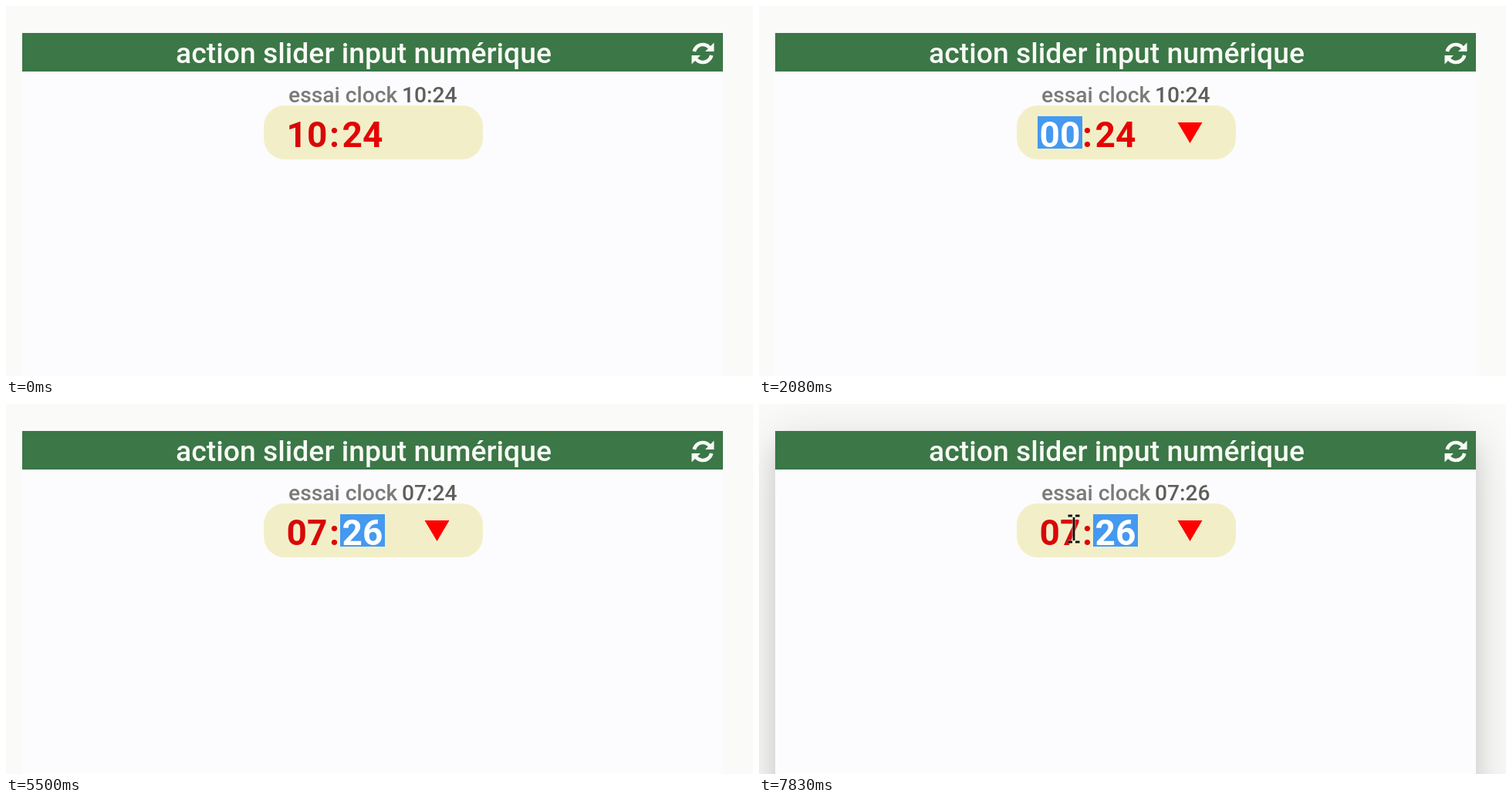
These frames come from a looping animation (968 by 480 pixels, 8000 ms). An HTML page with a canvas:

```html
<!DOCTYPE html>
<html lang="fr">
<head>
<meta charset="utf-8">
<title>Slider input</title>
<style>
html, body { margin: 0; width: 100%; height: 100%; overflow: hidden; background: #fafaf8; }
canvas { display: block; }
</style>
</head>
<body>
<canvas id="stage" width="968" height="480"></canvas>
<script>
const ctx = document.getElementById('stage').getContext('2d');
const LOOP = 8000, FPS = 12;
const CARD = { x: 21, y: 35, w: 908, h: 600 };
const FIELD = { x: 334, y: 129, w: 284, h: 70, r: 27 };
const LIGHT = '#f8faf4', BLUE = '#4499f0';

// Pointer visits: each point is [ms, x, y]
const visits = [
  { end: 1740, path: [[80, 640, 470], [420, 425, 215], [500, 405, 191], [580, 405, 191],
    [660, 368, 165], [750, 368, 165], [830, 381, 180], [1740, 386, 184]] },
  { end: LOOP, path: [[6750, 720, 470], [7330, 590, 255], [7580, 480, 95], [7830, 408, 162]] }
];

// Refresh icon spins: [start, end]
const spins = [[2840, 4075], [5670, 6905]];

const clamp = v => Math.max(0, Math.min(1, v));
function ramp(t, a, b) {
  const k = clamp((t - a) / (b - a));
  return k * k * (3 - 2 * k);
}

function text(str, x, y, size, weight, color, align = 'left') {
  ctx.font = `${weight} ${size}px Roboto, sans-serif`;
  ctx.fillStyle = color;
  ctx.textAlign = align;
  ctx.fillText(str, x, y);
}

function polygon(points, color) {
  ctx.beginPath();
  points.forEach(([x, y]) => ctx.lineTo(x, y));
  ctx.closePath();
  ctx.fillStyle = color;
  ctx.fill();
}

function cardShadow(alpha, blur, dy) {
  ctx.save();
  ctx.shadowColor = `rgba(0,0,0,${alpha})`;
  ctx.shadowBlur = blur;
  ctx.shadowOffsetY = dy;
  ctx.fillStyle = '#fcfcfe';
  ctx.fillRect(CARD.x, CARD.y, CARD.w, CARD.h);
  ctx.restore();
}

function drawCard(t) {
  ctx.fillStyle = '#fafaf8';
  ctx.fillRect(0, 0, 968, 480);
  const level = ramp(t, 0, 500) - ramp(t, 1000, 1420) + ramp(t, 6750, 7170);
  cardShadow(0.17 * level, 60, 16);
  cardShadow(0.08 * level, 24, 20);
  ctx.fillStyle = '#3b7747';
  ctx.fillRect(CARD.x, CARD.y, CARD.w, 50);
  text('action slider input numérique', 463.5, 74, 37.3, 500, LIGHT, 'center');
}

function drawRefresh(t) {
  const spin = spins.find(([a, b]) => t >= a && t < b);
  ctx.save();
  ctx.translate(903, 61.5);
  if (spin) ctx.rotate((t - spin[0]) / 1000 * 2 * Math.PI);
  for (let i = 0; i < 2; i++) {
    ctx.beginPath();
    ctx.arc(0, 0, 11.5, Math.PI * 1.07, Math.PI * 1.79);
    ctx.lineWidth = 4.6;
    ctx.strokeStyle = LIGHT;
    ctx.stroke();
    polygon([[14.5, -14], [14.5, -2.5], [3, -2.5]], LIGHT);
    ctx.rotate(Math.PI);
  }
  ctx.restore();
}

function drawPart(str, x, color, selected) {
  if (selected) {
    ctx.fillStyle = BLUE;
    ctx.fillRect(x, 143, 58, 42);
  }
  text(str, x + 29, 183, 46, 700, selected ? '#fff' : color, 'center');
}

function drawField(t) {
  const saved = t < spins[0][1] ? '10:24' : t < spins[1][1] ? '07:24' : '07:26';
  text('essai clock', 366, 124.5, 28.2, 500, '#7a7a78');
  text(saved, 584.5, 124.5, 28.2, 500, '#5e5e5a', 'right');

  ctx.beginPath();
  ctx.roundRect(FIELD.x, FIELD.y, FIELD.w, FIELD.h, FIELD.r);
  ctx.fillStyle = '#f2efc8';
  ctx.fill();

  const hours = t < 1995 ? '10' : t < 2415 ? '00' : '07';
  const minutes = t < 4910 ? '24' : t < 5495 ? '02' : '26';
  drawPart(hours, 361, '#d80808', t >= 825 && t < 2415);
  text(':', 425.5, 183, 46, 700, '#dc0808', 'center');
  drawPart(minutes, 433, '#e40404', t >= 2415);
  if (t >= 495) polygon([[542.5, 151], [574.5, 151], [558.5, 178]], '#f00');
}

function pointerAt(t) {
  const visit = visits.find(v => t >= v.path[0][0] && t < v.end);
  if (!visit) return null;
  const path = visit.path;
  const i = path.findIndex(p => p[0] > t);
  if (i < 0) return path[path.length - 1].slice(1);
  const [a, b] = [path[i - 1], path[i]];
  const k = (t - a[0]) / (b[0] - a[0]);
  return [a[1] + (b[1] - a[1]) * k, a[2] + (b[2] - a[2]) * k];
}

function drawBeam() {
  ctx.beginPath();
  for (const s of [-1, 1]) {
    ctx.moveTo(-7.5, 17 * s);
    ctx.lineTo(-2, 17 * s);
    ctx.moveTo(2, 17 * s);
    ctx.lineTo(7.5, 17 * s);
  }
  ctx.moveTo(0, -15);
  ctx.lineTo(0, 15);
  for (const [width, color] of [[5, 'rgba(255,255,240,.45)'], [2.8, '#111']]) {
    ctx.lineWidth = width;
    ctx.strokeStyle = color;
    ctx.stroke();
  }
}

function drawArrow() {
  polygon([[0, 0], [0, 30], [7, 24], [12, 35], [17, 33], [12, 22], [21, 22]], '#fff');
  ctx.lineWidth = 2;
  ctx.strokeStyle = '#111';
  ctx.stroke();
}

function drawPointer(t) {
  const p = pointerAt(t);
  if (!p) return;
  const [x, y] = p;
  const inside = x > FIELD.x && x < FIELD.x + FIELD.w && y > FIELD.y && y < FIELD.y + FIELD.h;
  ctx.save();
  ctx.translate(x, y);
  inside ? drawBeam() : drawArrow();
  ctx.restore();
}

function frame(now) {
  const t = Math.floor((now % LOOP + 4) * FPS / 1000) * 1000 / FPS;
  drawCard(t);
  drawRefresh(t);
  drawField(t);
  drawPointer(t);
  requestAnimationFrame(frame);
}
requestAnimationFrame(frame);
</script>
</body>
</html>
```
